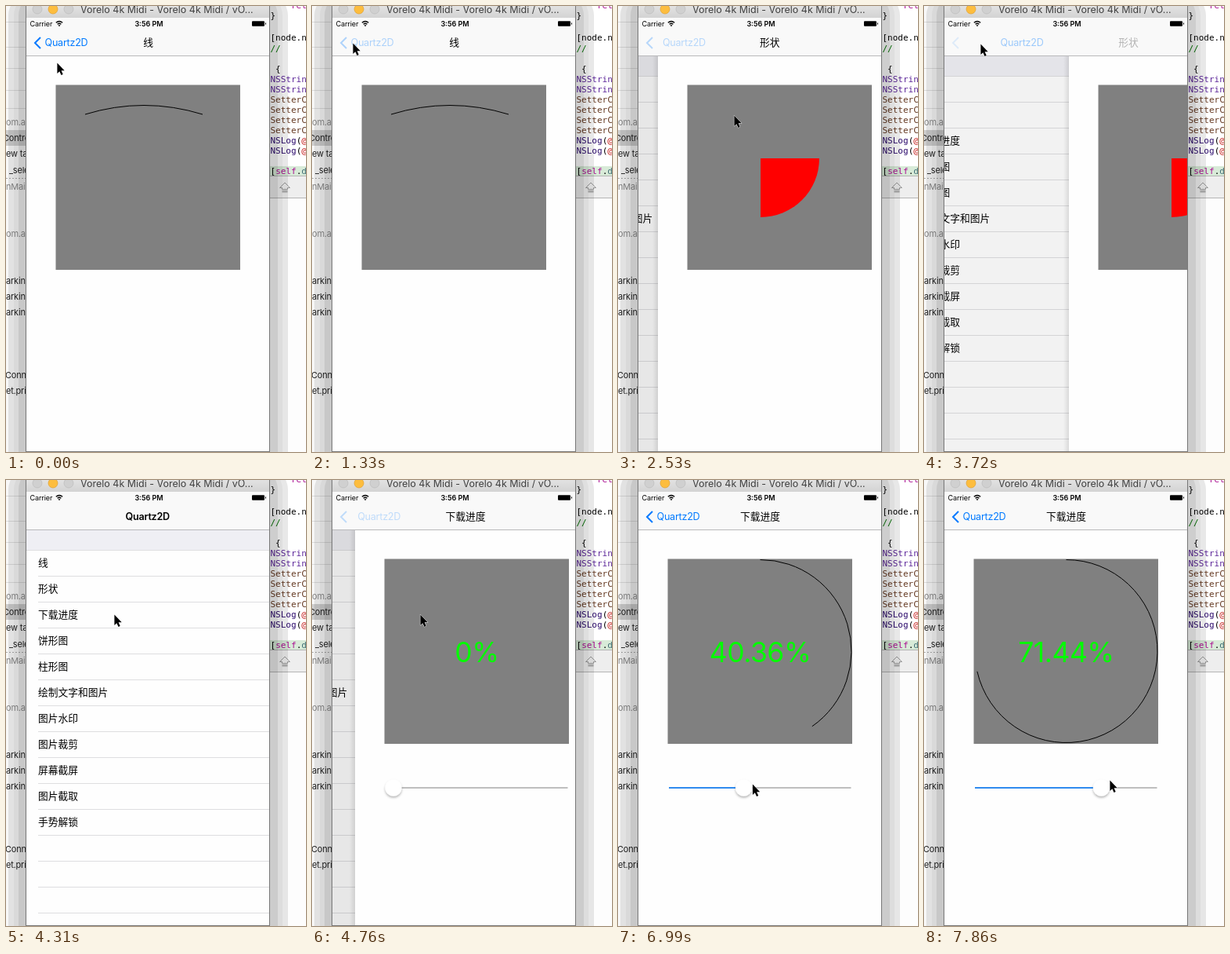
Recreate the animation shown at these times as an HTML page. Size 383 by 568 pixels, loop 8000 ms.

```html
<!DOCTYPE html>
<html lang="zh">
<head>
<meta charset="utf-8">
<title>Quartz2D</title>
<style>
html, body { margin: 0; width: 100%; height: 100%; overflow: hidden; background: #fff; }
svg { display: block; width: 383px; height: 568px; }
text { font-family: Inter, "Noto Sans CJK SC", "Noto Sans CJK", sans-serif; white-space: pre; }
.ui { font-size: 12.6px; letter-spacing: -.25px; }
.cjk { font: 12.75px "Noto Sans CJK SC", "Noto Sans CJK", sans-serif; }
.bold { font-weight: 600; }
.medium { font-weight: 500; }
.mid { text-anchor: middle; }
.code text { font: 11px "DejaVu Sans Mono", monospace; }
.side text { font: 11px Inter, sans-serif; letter-spacing: -.2px; }
</style>
</head>
<body>
<svg viewBox="0 0 383 568">
  <defs>
    <clipPath id="screen"><rect x="26" y="15" width="310" height="552"/></clipPath>
    <clipPath id="left"><rect width="25" height="568"/></clipPath>
    <linearGradient id="edge"><stop offset="0" stop-opacity="0"/><stop offset="1" stop-opacity=".1"/></linearGradient>
    <linearGradient id="bar" x2="0" y2="1"><stop offset="0" stop-color="#e2e2e2"/><stop offset="1" stop-color="#d3d3d3"/></linearGradient>
    <filter id="soft" x="-50%" y="-50%" width="200%" height="200%">
      <feDropShadow dx="0" dy="2" stdDeviation="1.5" flood-opacity=".3"/>
    </filter>
  </defs>

  <rect width="383" height="568" fill="#fdfdfd"/>
  <rect width="26" height="568" fill="#f8f8f8"/>
  <g id="rules" stroke="#dcdcdc"></g>
  <rect y="158" width="26" height="20" fill="#cecece"/>
  <g class="side" id="side" clip-path="url(#left)"></g>
  <path d="M0 219.5H25" stroke="#aaa" stroke-dasharray="2 2"/>

  <rect x="337" width="46" height="216" fill="#fff"/>
  <rect x="337" y="204" width="46" height="12" fill="#d8ebd8"/>
  <rect x="337" y="217" width="46" height="27" fill="#eee"/>
  <path d="M337 216.5H383M337 244.5H383" stroke="#b4b4b4"/>
  <g class="code" id="code"></g>
  <path d="M349.5 231.5L356 225L362.5 231.5H359.500V233.500H352.500V231.500ZM352.500 235.500H359.500M352.500 237H359.500" fill="none" stroke="#999"/>
  <g id="shade"></g>

  <rect x="25" width="312" height="568" fill="#777"/>
  <rect x="26" width="310" height="15" fill="url(#bar)"/>
  <g stroke-width=".7">
    <circle cx="40" cy="4" r="6" fill="#d0d0d0" stroke="#bcbcbc"/>
    <circle cx="60" cy="4" r="6" fill="#fdbd3e" stroke="#e0a030"/>
    <circle cx="80" cy="4" r="6" fill="#d0d0d0" stroke="#bcbcbc"/>
  </g>
  <text x="95" y="9" font-size="12.5" fill="#404040">Vorelo 4k Midi - Vorelo 4k Midi / vO...</text>

  <g clip-path="url(#screen)">
    <rect x="26" y="15" width="311" height="553" fill="#fff"/>
    <g id="list"></g>
    <rect id="dim" x="26" y="64" width="311" height="504"/>
    <g id="page">
      <rect x="19" y="64" width="7" height="504" fill="url(#edge)"/>
      <rect x="26" y="64" width="311" height="504" fill="#fefefe"/>
      <rect x="63.500" y="100.500" width="235.500" height="235.500" fill="#808080"/>
      <g class="kind"><path d="M101 138Q176 115 251 138" fill="none" stroke="#000"/></g>
      <g class="kind"><path d="M157 194H232A75 75 0 0 1 157 269Z" fill="#f00"/></g>
      <g class="kind">
        <path id="ring" fill="none" stroke="#000"/>
        <text id="pct" class="mid" x="181.500" y="231.500" font-size="35.500" letter-spacing="-.5" fill="#0f0"></text>
        <path d="M65 392H297.500" stroke="#aaa" stroke-width="1.500"/>
        <path id="fill" stroke="#007aff" stroke-width="1.600"/>
        <circle id="knob" cy="392" r="10.600" fill="#fff" filter="url(#soft)"/>
      </g>
    </g>

    <rect x="26" y="15" width="311" height="48.500" fill="#f9f9f9"/>
    <path d="M26 63.500H337" stroke="#b9b9bb"/>
    <text x="30.500" y="26" font-size="9" letter-spacing="-.1">Carrier</text>
    <g fill="none" stroke="#000" stroke-width="1.300">
      <path d="M63.800 21.300Q68 17.700 72.200 21.300M65.600 23.300Q68 21.200 70.400 23.300"/>
      <path d="M67 24.600H69L68 25.800Z" fill="#000" stroke-width=".6"/>
    </g>
    <text class="bold mid" x="182.500" y="26" font-size="9">3:56 PM</text>
    <path d="M314 20.300Q314 19.300 315 19.300H329Q330 19.300 330 20.300V24.700Q330 25.700 329 25.700H315Q314 25.700 314 24.700ZM331 21.500H332V23.500H331Z"/>

    <path id="chev" d="M44 40L37 47L44 54" fill="none" stroke="#007aff" stroke-width="2"/>
    <text id="back" class="ui" x="49.500" y="51" fill="#007aff">Quartz2D</text>
    <text id="home" class="ui bold" x="152.500" y="51">Quartz2D</text>
    <text id="title" class="cjk medium mid" x="181.500" y="51"></text>
  </g>

  <path id="cursor" d="M.4 .6V14L3.300 11.200L5.500 16L7.700 15L5.600 10.300H9.700Z" stroke="#fff" stroke-width="1" paint-order="stroke"/>
</svg>
<script>
const $ = id => document.getElementById(id);
const ROWS = ['线', '形状', '下载进度', '饼形图', '柱形图', '绘制文字和图片',
  '图片水印', '图片裁剪', '屏幕截屏', '图片截取', '手势解锁'];
const LOOP = 8000, STEP = 148.5, WIDTH = 311, OMEGA = 18.26;

// Static parts
$('rules').innerHTML = [20, 52, 79, 107, 130].map(y => `<path d="M0 ${y}.5H26"/>`).join('');
$('shade').innerHTML = [[3, .09], [10, .04], [16, .08]].map(([x, a]) =>
  `<rect x="${x}" y="-14" width="${363 - 2 * x}" height="620" rx="26" opacity="${a}"/>`).join('');
$('side').innerHTML = [
  ['om.apple', 0, 148, 1], ['Controller', -4, 168], ['ew table', 0, 188], ['_select', 4, 209],
  ['nMain', 0, 230, 1], ['om.apple', 0, 290, 1], ['arking', 0, 350], ['arking', 0, 370],
  ['arking', 0, 390], ['Connect', -1, 470], ['et.prior', 0, 490]
].map(([s, x, y, pale]) => `<text x="${x}" y="${y + 4}" fill="${pale ? '#888' : '#222'}">${s}</text>`).join('');

const INK = { k: '#000', p: '#5c2699', b: '#643820', n: '#2e0d6e', r: '#c41a16', m: '#aa0d91', g: '#007400', t: '#3f6e74' };
const str = 'p:NSString', set = 'b:SetterC', log = 'n:NSLog|k:(|r:@"';
$('code').innerHTML = [
  [-1, 'm:    return'], [12, 'k:}'], [40, 'k:[node.n'], [54, 'g://'], [80, 'k: {'],
  [93, str], [106, str], [119, set], [132, set], [145, set], [158, set],
  [171, log], [184, log], [210, 'k:[|m:self|k:.|t:d']
].map(([y, line]) => `<text x="337.5" y="${y + 4}">` + line.split('|').map(s =>
  `<tspan fill="${INK[s[0]]}">${s.slice(2)}</tspan>`).join('') + '</text>').join('');

const lines = Array.from({ length: 14 }, (_, i) => `<path d="M41 ${122.5 + 33 * i}H337"/>`).join('');
$('list').innerHTML = `<rect x="26" y="64" width="311" height="504" fill="#fefefe"/>
  <rect x="26" y="64" width="311" height="26" fill="#efeff4"/>
  <g stroke="#dedee0"><path d="M26 89.5H337"/>${lines}</g>` +
  ROWS.map((s, i) => `<text class="cjk" x="41" y="${110 + 33 * i}">${s}</text>`).join('');

// Motion tables, counted in steps: [step, values...]
const CURSOR = [[0, 65, 72], [1, 62, 64], [2, 57, 54], [3, 54, 49], [4, 54, 49], [5, 53, 48], [6, 52, 47],
  [9, 52, 47], [10, 62, 58], [13, 150, 123], [15, 148, 139], [18, 148, 139], [22, 62, 47], [24, 62, 47],
  [25, 72, 48], [29, 138, 171], [32, 138, 171], [33, 136, 185], [37, 98, 370], [40, 80, 390],
  [41, 80, 390], [49, 202, 386], [53, 237, 382]];
const VALUE = [[41, 0], [42, .0217], [49, .5563], [53, .7144]];
// [start, 1 = open a page, 0 = go back]
const SLIDES = [[-9, 1], [9.367, 0], [15.46, 1], [24.367, 0], [30.53, 1]];
const PRESSES = [[9, 9.367], [23, 24.367]];

const clamp = v => Math.max(0, Math.min(1, v));
function at(keys, n) {
  const i = keys.findIndex(k => k[0] > n);
  if (i < 0) return keys[keys.length - 1].slice(1);
  if (i === 0) return keys[0].slice(1);
  const a = keys[i - 1], b = keys[i], f = (n - a[0]) / (b[0] - a[0]);
  return a.slice(1).map((v, j) => v + (b[j + 1] - v) * f);
}
const shift = (el, x, y = 0) => el.setAttribute('transform', `translate(${x.toFixed(2)} ${y.toFixed(2)})`);
const fade = (el, a) => el.setAttribute('opacity', clamp(a).toFixed(3));
const kinds = [...document.querySelectorAll('.kind')];

function drawSlide(n) {
  const past = SLIDES.filter(s => s[0] <= n);
  const [start, open] = past[past.length - 1];
  const kind = past.filter(s => s[1]).length - 1;
  const s = (n - start) * STEP / 1000;
  const rest = (1 + OMEGA * s) * Math.exp(-OMEGA * s);
  const away = open ? rest : 1 - rest;

  shift($('page'), Math.round(away * WIDTH));
  shift($('list'), Math.round(-.3 * WIDTH * (1 - away)));
  $('page').style.display = away > .998 ? 'none' : '';
  fade($('dim'), .1 * (1 - away));
  kinds.forEach((k, i) => k.style.display = i === kind ? '' : 'none');

  const pressed = PRESSES.some(([a, b]) => n >= a && n < b);
  const show = open ? (s - .15) / .3 : 1 - s / .15;
  shift($('back'), away * 94);
  shift($('home'), (away - 1) * 94);
  shift($('title'), away * WIDTH * .5);
  fade($('back'), pressed ? .3 : show);
  fade($('chev'), pressed ? .3 : open ? show : .2 - s);
  fade($('home'), open ? 1 - s / .15 : (s - .1) / .3);
  fade($('title'), open ? s / .2 : 1 - s / .13);
  $('title').textContent = ROWS[kind];
}

function drawProgress(n) {
  const [p] = at(VALUE, n);
  const a = p * 2 * Math.PI, r = 116.5, cx = 181.5, cy = 218;
  const x = 75 + 212 * p;
  $('pct').textContent = p ? (p * 100).toFixed(2) + '%' : '0%';
  $('ring').setAttribute('d', p
    ? `M${cx} ${cy - r}A${r} ${r} 0 ${+(p > .5)} 1 ${cx + r * Math.sin(a)} ${cy - r * Math.cos(a)}` : '');
  $('fill').setAttribute('d', `M65 392H${x}`);
  $('knob').setAttribute('cx', x);
}

function draw(ms) {
  const n = Math.floor(ms / STEP + .12);
  drawSlide(n);
  drawProgress(n);
  shift($('cursor'), ...at(CURSOR, n));
}

const t0 = performance.now();
function tick() {
  draw((performance.now() - t0) % LOOP);
  requestAnimationFrame(tick);
}
tick();
</script>
</body>
</html>
```
